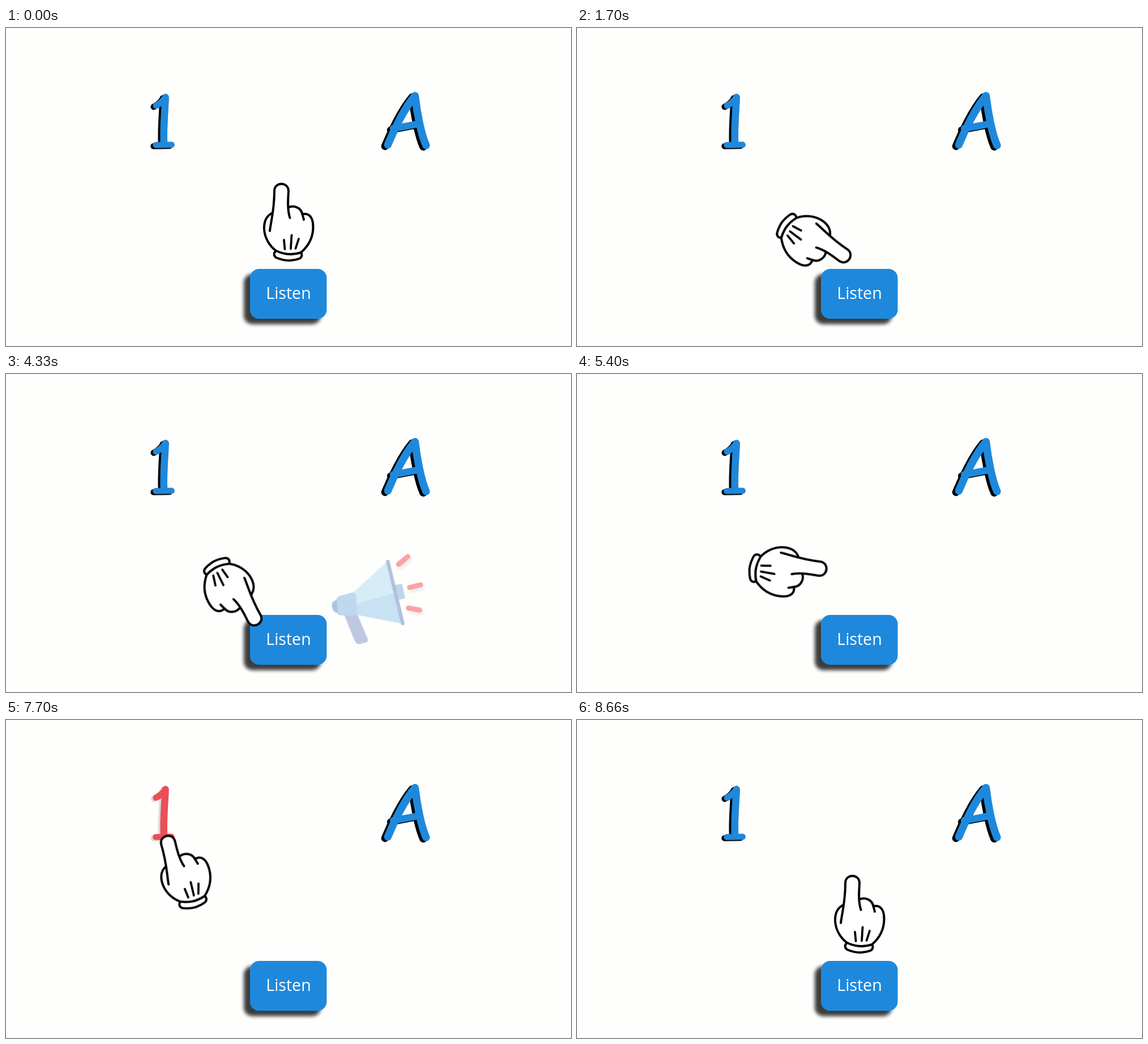
These frames come from a looping animation (998x561 px, 9 s). An HTML page:

```html
<!DOCTYPE html>
<html lang="en">
<head>
<meta charset="utf-8">
<title>Listen and choose</title>
<style>
  html, body { margin: 0; width: 100%; height: 100%; overflow: hidden; background: #fefefd; }
  svg { display: block; width: 100vw; height: 100vh; }

  .lettering { fill: none; stroke-linecap: round; stroke-linejoin: round; }
  .blue { stroke: #1e89dc; }
  .black { stroke: #000; }
  .red { stroke: #f84b50; filter: drop-shadow(-3px 2px 1.5px rgba(0, 0, 0, .12)); }
  .label { font: 500 28.6px "Open Sans", sans-serif; fill: #fff; text-anchor: middle; }

  .hand { fill: #fff; stroke: #000; stroke-width: 4; stroke-linecap: round; stroke-linejoin: round;
          transform-origin: 499px 342px; animation: point 9s linear infinite; }
  .speaker { transform-origin: 499px 469px;
             animation: appear 9s linear infinite, grow 9s linear infinite; }
  .choice { animation: choose 9s linear infinite; }

  /* Each move is a quadratic ease in and out, split at its midpoint. */
  @keyframes point {
    0%, 11.111% {
      transform: translate(0px, 0px) rotate(0deg);
      animation-timing-function: cubic-bezier(.333, 0, .667, .333);
    }
    16.667% {
      transform: translate(-49.25px, 24px) rotate(75deg);
      animation-timing-function: cubic-bezier(.333, .667, .667, 1);
    }
    22.222%, 55.556% {
      transform: translate(-98.5px, 48px) rotate(150deg);
      animation-timing-function: cubic-bezier(.333, 0, .667, .333);
    }
    61.111% {
      transform: translate(-141.9px, -14.5px) rotate(66.5deg);
      animation-timing-function: cubic-bezier(.333, .667, .667, 1);
    }
    66.667%, 85.185% {
      transform: translate(-185.3px, -77px) rotate(-17deg);
      animation-timing-function: cubic-bezier(.333, 0, .667, .333);
    }
    90.741% {
      transform: translate(-92.65px, -38.5px) rotate(-8.5deg);
      animation-timing-function: cubic-bezier(.333, .667, .667, 1);
    }
    96.296%, 100% { transform: translate(0px, 0px) rotate(0deg); }
  }
  @keyframes appear {
    0%, 22.222% { opacity: 0; animation-timing-function: cubic-bezier(.39, .575, .565, 1); }
    33.333%, 44.444% { opacity: 1; animation-timing-function: cubic-bezier(.39, .575, .565, 1); }
    55.556%, 100% { opacity: 0; }
  }
  @keyframes grow {
    0%, 22.222% { transform: scale(.924); }
    33.333%, 44.444% { transform: scale(1.113); }
    55.556%, 100% { transform: scale(.924); }
  }
  @keyframes choose {
    0%, 60% { opacity: 1; animation-timing-function: cubic-bezier(.39, .575, .565, 1); }
    70%, 85.185% { opacity: 0; animation-timing-function: cubic-bezier(.39, .575, .565, 1); }
    96.296%, 100% { opacity: 1; }
  }
</style>
</head>
<body>
<svg viewBox="0 0 998 561" preserveAspectRatio="none">
  <defs>
    <filter id="soft" x="-20%" y="-20%" width="140%" height="140%">
      <feGaussianBlur stdDeviation="3"/>
    </filter>
    <g id="one" class="lettering">
      <path stroke-width="11" d="M265 137 Q274 133 282 122"/>
      <path stroke-width="12.500" d="M281.500 122.500 C281 145 277.500 170 279 205"/>
      <path stroke-width="10.500" d="M264.500 206.500 L292.500 206"/>
    </g>
    <g id="letter" class="lettering">
      <path stroke-width="13.500" d="M674.500 206 C685 180 704 141 722.500 119.500 C726 149 733 187 742 207"/>
      <path stroke-width="12" d="M684 177.500 L729 169"/>
    </g>
  </defs>

  <g role="img" aria-label="1">
    <use href="#one" class="red"/>
    <g class="choice">
      <use href="#one" class="black" x="-4" y="2"/>
      <use href="#one" class="blue"/>
    </g>
  </g>
  <g role="img" aria-label="A">
    <use href="#letter" class="black" x="-5" y="2.500"/>
    <use href="#letter" class="blue"/>
  </g>

  <rect x="420" y="434" width="136" height="88.500" rx="15" fill="#000" opacity=".76" filter="url(#soft)"/>
  <rect x="431" y="425" width="135.500" height="88" rx="16" fill="#1e89dc"/>
  <text class="label" x="499" y="477.500">Listen</text>

  <g class="speaker">
    <path fill="#7f90c3" d="M593 428 L614 424 L632 467 Q634 472 629 473.500 L619 476 Q613 477 610 470Z"/>
    <path fill="#82abd8" d="M678 377 L690 374.500 L695 399 L684 402Z"/>
    <path fill="#afdbf5" d="M607 390 L665 337 L691 442 L614 427Z"/>
    <path fill="#91c5e8" d="M611 409 L678 390 L691 442 L614 427Z"/>
    <path fill="#82b2de" d="M585 395 L608 389 Q613 390 613 398 L615 423 Q615 428 609 428 L587 428 Q580 428 580 419 L579 404 Q579 397 585 395Z"/>
    <path fill="#5d84c0" d="M580 402 L582 424 Q574 424 572 413 Q571 404 580 402Z"/>
    <path stroke="#6380bc" stroke-width="6" stroke-linecap="round" d="M666 337.500 L691 441.500"/>
    <path stroke="#f84448" stroke-width="8.500" stroke-linecap="round"
          style="filter: drop-shadow(3px 4px 3px rgba(0, 0, 0, .18))"
          d="M684 342 L699.500 329 M702.500 381 L721 376.500 M700.500 415.500 L719.500 419"/>
  </g>

  <g class="hand">
    <path d="M477 393 C472 397 473 402 477 405 Q499 414.500 519 406.500 C524 403 523 398 520 395"/>
    <path d="M471 326 C460 331 455.500 342 456 355 C457 371 466 385 477 393 Q500 403.500 521 396
             C535 384 542.500 368 542.500 351 C542.500 333 535 326 523.500 328.500
             C521 316 508 312.500 498.500 316.500"/>
    <path d="M523.500 328.500 L526 338" fill="none"/>
    <path d="M466 358 C468 341 474 321 474 288 C474 270.500 499 270.500 499 288
             C498 305 497 321 501.500 335"/>
    <path d="M491 374 L492.500 390 M504.500 365.500 L503 389.500 M517 372 L511.500 389" stroke-width="3.800"/>
  </g>
</svg>
</body>
</html>
```
